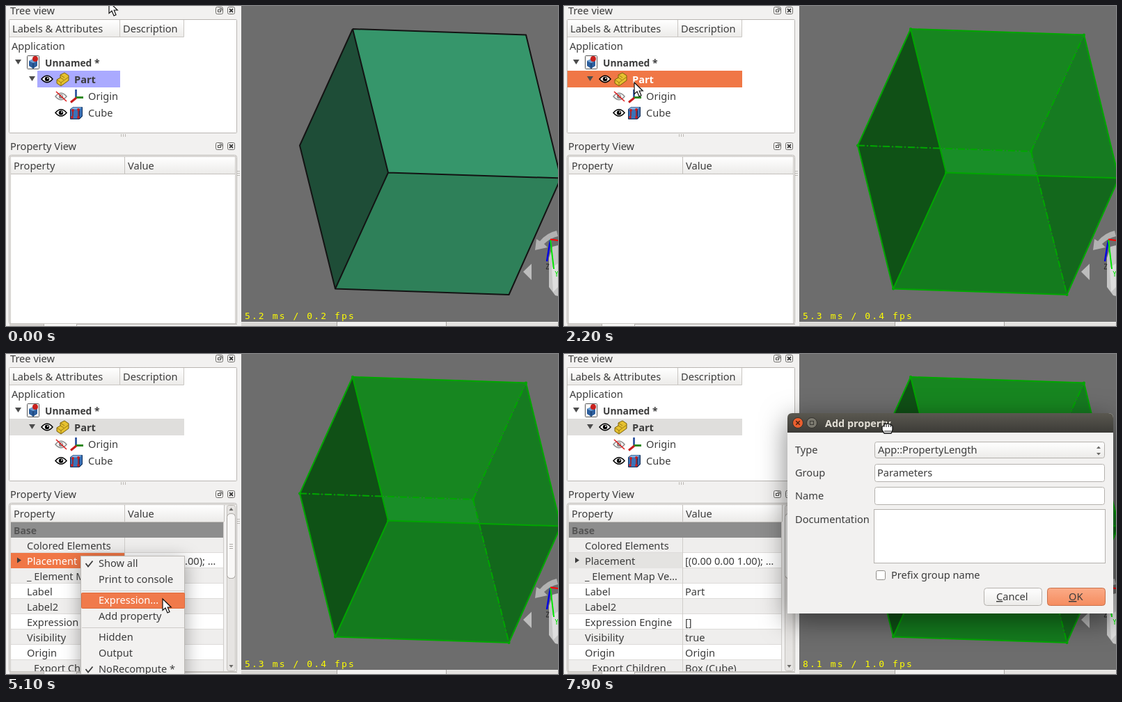
Recreate the animation shown at these times as an HTML page. Size 793x460 px, loop 8000 ms.

```html
<!DOCTYPE html>
<html lang="en">
<head>
<meta charset="utf-8">
<title>Adding a property</title>
<style>
html, body { margin: 0; width: 100%; height: 100%; overflow: hidden; background: #f2f1f0; }
svg { display: block; width: 793px; height: 460px; }
text { font: 14.6px "Noto Sans", "Open Sans", sans-serif; fill: #3c3c3c; white-space: pre; }
.b { font-weight: bold; }
#fps { font: 13px "DejaVu Sans Mono", monospace; letter-spacing: 2.1px; fill: #ff0; }
.menuBase { filter: drop-shadow(0 5px 13px rgba(0,0,0,.35)); }
.dlgBase { filter: drop-shadow(0 10px 19px rgba(0,0,0,.5)); }
</style>
</head>
<body>
<svg id="stage" viewBox="0 0 793 460" xmlns="http://www.w3.org/2000/svg">
<defs>
  <linearGradient id="head" x2="0" y2="1"><stop stop-color="#fff"/><stop offset="1" stop-color="#ecebe9"/></linearGradient>
  <linearGradient id="bar" x2="0" y2="1"><stop stop-color="#5a5850"/><stop offset="1" stop-color="#3c3b37"/></linearGradient>
  <linearGradient id="ok" x2="0" y2="1"><stop stop-color="#fbab87"/><stop offset="1" stop-color="#f58c5f"/></linearGradient>
  <clipPath id="rowsClip"><rect x="7" y="242" width="323" height="214"/></clipPath>
  <clipPath id="viewClip"><rect x="338" width="455" height="454"/></clipPath>
</defs>
</svg>
<script>
const stage = document.getElementById('stage');

// Markup helpers
const rect = (x, y, w, h, fill, more = '') =>
  `<rect x="${x}" y="${y}" width="${w}" height="${h}" fill="${fill}" ${more}/>`;
const frame = (x, y, w, h, fill, line, r = 0, more = '') =>
  rect(x + .5, y + .5, w - 1, h - 1, fill, `stroke="${line}" rx="${r}" ${more}`);
const text = (x, y, s, more = '') => `<text x="${x}" y="${y}" ${more}>${s}</text>`;
const path = (d, stroke, w = 1, fill = 'none', more = '') =>
  `<path d="${d}" stroke="${stroke}" stroke-width="${w}" fill="${fill}" ${more}/>`;
const shape = (d, fill) => `<path d="${d}" fill="${fill}"/>`;
const dot = (x, y, r, fill, more = '') => `<circle cx="${x}" cy="${y}" r="${r}" fill="${fill}" ${more}/>`;
const group = (id, body, more = '') => `<g id="${id}" ${more}>${body}</g>`;

// Box: outer vertices, hidden corner H, crossings I and J of the projected edges
const V = { A: [498, 33], B: [747, 41.5], C: [797, 247.5], D: [549, 239.5], E: [422, 200.5],
            F: [473, 406.5], G: [722.5, 415], H: [671, 209], I: [541, 204.5], J: [680, 244] };
const line = s => 'M' + [...s].map(k => V[k]).join('L');
const face = (s, fill) => shape(line(s) + 'Z', fill);
const OUTER = ['ABCGFEA', 'ADF', 'DC'].map(line).join('');
const HIDDEN = ['EH', 'HB', 'HG'].map(line).join('');
const REGIONS = ['AEI', 'EFDI', 'ABHI', 'IHJD', 'BCJH', 'DJGF', 'JCG'];
const glass = colors => REGIONS.map((r, i) => face(r, colors[i])).join('');

const solidBox = face('ABCD', '#36966b') + face('ADFE', '#1e4d37') + face('DCGF', '#2e8059') +
  path(OUTER, '#131313', 2, 'none', 'stroke-linejoin="round"');
const yellowBox =
  glass(['#5a621a', '#5f6918', '#8aa029', '#98a634', '#7f913c', '#808e22', '#6b761a']) +
  path(OUTER + HIDDEN, '#ecd817', 2) +
  [...'ABDEFGH'].map(k => dot(...V[k], 2.4, '#ecd817')).join('');
const greenBox =
  glass(['#105016', '#0f5216', '#178620', '#198e28', '#167b21', '#147b1e', '#13681c']) +
  path(OUTER, '#00a600', 2) + path(HIDDEN, '#00a600', 2, 'none', 'stroke-dasharray="10 3 2 3"') +
  [...'ABDEFGH'].map(k => dot(...V[k], 2, '#00a600')).join('');

const gizmo =
  shape('M760 351L762 335L767 338Q777 326 791 323L793 331Q781 334 773 342L778 347Z', '#b2b2b2') +
  shape('M743 382L755 370.5V394Z', '#bdbdbd') +
  shape('M780 362L785 346L793 344V417L789 416L780 404Z', '#c6c6c6') +
  shape('M784 376L793 370V404L786 411Z', '#dedede') +
  path('M782 336L777 367', '#0000e6', 2.4) + path('M782 336L787 378', '#00e600', 2) +
  path('M782 335.5L793 337', '#f00', 2) +
  path('M776 371H780L776 378H780', '#222') + path('M789 381L791 385L793 381M791 385V389', '#00e600');

const view = rect(338, 0, 455, 454, '#6d6d6d') +
  `<g clip-path="url(#viewClip)">` + group('solid', solidBox) + group('yellow', yellowBox) +
  group('green', greenBox) + gizmo + '</g>' + text(343, 450, '', 'id="fps"') +
  rect(338, 454, 455, 6, '#f2f1f0') + rect(338, 455, 138, 5, '#d8d6d3') + rect(633, 455, 160, 5, '#e4e2e0') +
  path('M475.5 454V460M632.5 454V460', '#aaa7a3');

// Left panels
const dockIcons = y =>
  frame(301, y - 5, 11, 11, '#f8f7f6', '#6a6966', 2) + frame(304, y - 1, 5, 4, 'none', '#4a4a48') +
  path(`M306.5 ${y - 2.5}H310V${y + .5}`, '#4a4a48') +
  frame(318, y - 5, 11, 11, '#f8f7f6', '#6a6966', 2) +
  path(`M321 ${y - 2}l5 5m0 -5l-5 5`, '#3c3c3c', 1.8);
const eye = (x, y, c = '#000') =>
  path(`M${x - 8} ${y}Q${x} ${y - 9.5} ${x + 8} ${y}Q${x} ${y + 9.5} ${x - 8} ${y}Z`, c, 1.5, '#fff', 'fill-opacity=".8"') +
  dot(x, y, 3.2, c) + dot(x + 1, y - 1, 1, '#fff');
const fold = (x, y) => shape(`M${x} ${y}h9l-4.5 7Z`, '#4c4c4c');

const icons =
  frame(30, 71, 18, 20, '#fff', '#555', 1) + shape('M33 79l6-3 6 3v7l-6 4-6-4Z', '#2d5f9e') +
  shape('M33 79l6-3 6 3-6 3Z', '#6f9fd2') + path('M39 82v8', '#12355f') + dot(42, 76, 4, '#c8201c') +
  path('M73 106l5-3v-4l6-3 6 4v7l-11 8-6-4Z', '#7a5f08', 1, '#e6c12f') +
  path('M73 106l6 4 11-8M79 110v4M78 103l5 3M78 99l6 4', '#9a7a10') +
  path('M100.5 120V132', '#244a9a', 2.6) + path('M100 131.5H111', '#2f8a1e', 3) +
  path('M101 132L93 138.5', '#c81e1e', 3) +
  path('M92.5 148.5l4-3h13v13l-4 4h-13Z', '#12305c', 1, '#3a72b8') +
  shape('M93 148.5l4-3h12l-4 3Z', '#86b3e2') + path('M105.5 148.5V162l4-4', '#12305c') +
  path('M96 158V150M104 150V158', '#b01818', 1.5) +
  [[95, 160], [104, 160], [96, 150], [104, 149]].map(p => dot(...p, 1.9, '#c81e1e')).join('');

const tree = text(6, 12, 'Tree view') + dockIcons(6) +
  frame(4, 19, 328, 164, '#fff', '#b9b6b2', 1) + rect(5, 20, 250, 24, 'url(#head)') +
  path('M5 44.5H255.5V20M163.5 20V44', '#c9c6c2') +
  text(9, 38, 'Labels &amp; Attributes') + text(168, 38, 'Description') +
  rect(45, 93, 119, 24, '#aaf', 'id="partRow"') +
  text(8, 63, 'Application') + text(56, 87, 'Unnamed *', 'class="b" style="font-size:13.8px"') +
  text(98, 111, 'Part', 'class="b" id="partName"') +
  text(118, 135, 'Origin') + text(118, 159, 'Cube') +
  fold(13, 77) + fold(33, 101) + icons + eye(59, 105) + eye(79, 130, '#8b8b8b') +
  path('M72 123L87 137', '#e02020', 1.6) + eye(79, 153.5);

const ROWS = [['Colored Elements', ''], ['Placement', '[(0.00 0.00 1.00); …'], ['_ Element Map Ve…', ''],
  ['Label', 'Part'], ['Label2', ''], ['Expression Engine', '[]'], ['Visibility', 'true'],
  ['Origin', 'Origin'], ['Export Children', 'Box (Cube)']];
const rowList = ROWS.map(([name, value], i) => {
  const y = 264 + 22 * i, place = name === 'Placement';
  return rect(7, y, 306, 22, i % 2 ? '#fff' : '#efeeed') +
    path(`M7 ${y + 21.5}H313`, '#dddbd9') +
    (place ? rect(7, y, 163, 22, 'none', 'id="placeCell"') : '') +
    text(i === 8 ? 40 : 30, y + 17, name, place ? 'id="placeName"' : '') + text(174, y + 17, value) +
    (place ? shape(`M16 ${y + 28.5 - 22}l6 4-6 4Z`.replace(y + 6.5, y + 6.5), '#3c3c3c') : '');
}).join('');

const scrollbar = rect(313, 217, 17, 240, '#f2f1f0') + frame(317, 217, 13, 239, '#e6e4e2', '#c4c1bd', 3) +
  frame(317, 229, 13, 94, '#f8f7f6', '#a8a5a1', 5) +
  path('M321 273.5h5m-5 3h5m-5 3h5', '#aaa7a3') +
  shape('M320.5 225h6l-3-4Z', '#6a6966') + shape('M320.5 447h6l-3 4Z', '#6a6966');

const props = text(6, 207, 'Property View') + dockIcons(201) +
  frame(4, 214, 328, 244, '#f2f1f0', '#b9b6b2', 3) + frame(6, 216, 324, 241, '#fff', '#c9c6c2') +
  rect(7, 217, 322, 24, 'url(#head)') + path('M7 241.5H329M170.5 217V241', '#c4c1bd') +
  text(11, 235, 'Property') + text(175, 235, 'Value') +
  group('rows', rect(7, 242, 306, 22, '#8d8d8d') +
    text(11, 259, 'Base', 'class="b" style="fill:#555;font-size:14px"') + rowList +
    path('M170.5 264V456', '#cfcdca') + path('M312.5 242V456', '#cfcdca') + scrollbar,
    'clip-path="url(#rowsClip)"') +
  group('scrollTop', rect(313, 217, 17, 25, '#f2f1f0') + frame(317, 217, 13, 30, '#e6e4e2', '#c4c1bd', 3) +
    frame(317, 229, 13, 94, '#f8f7f6', '#a8a5a1', 5) + path('M321 273.5h5m-5 3h5m-5 3h5', '#aaa7a3') +
    shape('M320.5 225h6l-3-4Z', '#6a6966') + path('M313.5 217V241', '#c4c1bd'));

const trims = path('M165.5 184v4m3-4v4m3-4v4', '#bbb8b4') + path('M332 237.5h4m-4 3h4m-4 3h4', '#bbb8b4') +
  rect(5, 457, 50, 3, '#d5d2cf') + rect(55, 457, 47, 3, '#f8f7f6') + path('M102 457.5H332M54.5 457V460M101.5 457V460', '#b9b6b2');

// Context menu: label, row top, checked
const ITEMS = [['Show all', 290, 1], ['Print to console', 313], ['Expression...', 343], ['Add property', 366],
  ['Hidden', 396], ['Output', 419], ['NoRecompute *', 442, 1]];
const menu = frame(107, 290, 150, 190, '#f2f1f0', '#bcb9b5', 0, 'class="menuBase"') +
  path('M109 340.5H256M109 393.5H256', '#cfccc9') +
  frame(108, 0, 149, 23, '#f07a4b', '#dc6a3c', 1, 'id="hover"') +
  ITEMS.map(([s, y, on]) => text(133, y + 16, s, 'class="item"') +
    (on ? path(`M114.5 ${y + 11}l3.5 4.5 6.5-8`, '#3c3c3c', 1.8) : '')).join('');

// Dialog, in its own coordinates
const field = (y, h, s = '') => frame(125, y, 331, h, '#fff', '#b4b1ad', 3) + text(129, y + 18, s);
const button = (x, fill, edge, tx, s) => frame(x, 251, 84, 26, fill, edge, 4) + text(tx, 269, s);
const dialog =
  `<path class="dlgBase" d="M0 288V7Q0 0 7 0H461Q468 0 468 7V288Z" fill="#f2f1f0"/>` +
  shape('M0 28V7Q0 0 7 0H461Q468 0 468 7V28Z', 'url(#bar)') +
  dot(15, 14, 7.5, '#ea5f2f', 'stroke="#33312d"') + path('M12.3 11.3l5.4 5.4m0-5.4l-5.4 5.4', '#4a2010', 1.6) +
  dot(35, 14, 7.5, '#7b796f', 'stroke="#33312d"') + frame(32, 11, 6, 6, 'none', '#3a3934') +
  text(54, 19.5, 'Add property', 'class="b" style="fill:#e2ded5;font-size:14.4px"') +
  text(11, 58, 'Type') + text(11, 91, 'Group') + text(11, 124, 'Name') + text(11, 158, 'Documentation') +
  frame(125, 41, 331, 24, 'url(#head)', '#b4b1ad', 3, 'id="combo"') + text(130, 58, 'App::PropertyLength') +
  shape('M444 51h6l-3-3.5ZM444 57h6l-3 3.5Z', '#6a6966') +
  field(73, 26, 'Parameters') + field(106, 26) + frame(124, 138, 333, 78, '#fff', '#b4b1ad') +
  frame(127, 226, 14, 14, '#fff', '#8f8c88', 2) + text(149, 238, 'Prefix group name') +
  button(282, 'url(#head)', '#b4b1ad', 300, '<tspan text-decoration="underline">C</tspan>ancel') +
  button(373, 'url(#ok)', '#c9714b', 404, '<tspan text-decoration="underline">O</tspan>K');

// Pointers, hot spot at 0,0
const arrow = path('M0 0V16.5L4 13L7 20L10 18.7L7.2 12H12.2Z', '#111', 1.2, '#fff');
const beamLine = 'M-3.5-7.5Q0-7.5 0-6Q0-7.5 3.5-7.5M0-6V6.5M-3.5 8Q0 8 0 6.5Q0 8 3.5 8';
const beam = path(beamLine, '#fff', 4) + path(beamLine, '#000', 1.8);
const fist = path('M-7-1Q-7-3-4-2V-4Q-3-7-1-5Q1-7 2.5-5Q5-6 5.5-3.5Q8-4 8-1V3L6 8H-4L-7 3Z', '#111', 1.3, '#fff') +
  path('M-1-4V-1M2.5-4V-1M5.5-3V-1M-4 5H6', '#111');

stage.insertAdjacentHTML('beforeend', rect(0, 0, 338, 460, '#f2f1f0') + tree + props + trims + view +
  group('menu', menu) + group('dialog', dialog) +
  group('arrow', arrow) + group('beam', beam) + group('fist', fist));

const el = id => document.getElementById(id);
const show = (id, on) => { el(id).style.display = on ? '' : 'none'; };
const items = [...document.querySelectorAll('.item')];

// Pointer path: time, x, y
const PATH = [[0, 148, -6], [100, 240, 14], [200, 350, 55], [300, 393, 77], [700, 393, 77], [800, 381, 78],
  [1200, 250, 95], [1500, 131, 110], [1600, 116, 111], [1800, 101, 110], [3100, 101, 110], [3200, 106, 147],
  [3600, 109, 280], [3800, 107, 291], [4400, 107, 291], [4600, 150, 308], [4900, 264, 338], [5200, 205, 359],
  [5400, 180, 372], [6400, 180, 372], [6500, 196, 362], [6800, 345, 268], [7100, 515, 165], [7200, 531, 152],
  [7300, 517, 130], [7400, 504, 112], [7500, 495, 102], [7700, 503, 96], [7800, 503, 96], [7900, 464, 106]];
const STEP = 100, LOOP = 8000;

function pointer(t) {
  const i = PATH.findIndex(p => p[0] > t);
  if (i < 0) return PATH[PATH.length - 1].slice(1);
  const [t0, x0, y0] = PATH[i - 1], [t1, x1, y1] = PATH[i], k = (t - t0) / (t1 - t0);
  return [Math.round(x0 + (x1 - x0) * k), Math.round(y0 + (y1 - y0) * k)];
}
const set = (id, attrs) => { for (const k in attrs) el(id).setAttribute(k, attrs[k]); };

function draw(t) {
  const [x, y] = pointer(t);
  const picked = t >= 2200, menuAt = t >= 3800, open = t >= 6200;

  show('solid', t < 2000);
  show('yellow', t >= 2000 && !picked);
  show('green', picked);
  el('fps').textContent = open ? '8.1 ms / 1.0 fps' : picked ? '5.3 ms / 0.4 fps' : '5.2 ms / 0.2 fps';

  set('partRow', picked ? { x: 5, width: 251, fill: menuAt ? '#dfdedc' : '#f07746' } : { x: 45, width: 119, fill: '#aaf' });
  el('partName').style.fill = picked && !menuAt ? '#fff' : '';
  show('rows', t >= 2300);
  show('scrollTop', t >= 2300);
  set('placeCell', { fill: open ? '#e4e3e1' : menuAt ? '#f07746' : 'none' });
  el('placeName').style.fill = menuAt && !open ? '#fff' : '';

  const fade = t < 3900 || open ? 0 : t < 4000 ? .25 : t < 4100 ? .65 : t < 6100 ? 1 : .65;
  show('menu', fade > 0);
  el('menu').style.opacity = fade;
  const over = ITEMS.findIndex(([, top]) => x > 108 && x < 257 && y > top && y <= top + 23);
  show('hover', over >= 0);
  if (over >= 0) set('hover', { y: ITEMS[over][1] + .5 });
  items.forEach((n, i) => { n.style.fill = i === over ? '#fff' : ''; });

  show('dialog', open);
  set('dialog', { transform: t < 7900 ? 'translate(360 75)' : 'translate(321 85)' });
  set('combo', { fill: x > 485 && y > 116 && y < 140 ? '#fff' : 'url(#head)' });

  const grab = t >= 7700;
  const typing = open && x >= 485 && (y >= 148 && y < 174 || y >= 181 && y < 207 || y >= 213 && y < 291);
  const kind = grab ? 'fist' : typing ? 'beam' : 'arrow';
  for (const id of ['arrow', 'beam', 'fist']) show(id, id === kind);
  set(kind, { transform: `translate(${x} ${y})` });
}

const start = performance.now();
function tick() {
  const t = (performance.now() - start) % LOOP;
  draw(Math.floor(t / STEP) * STEP);
  requestAnimationFrame(tick);
}
tick();
</script>
</body>
</html>
```
